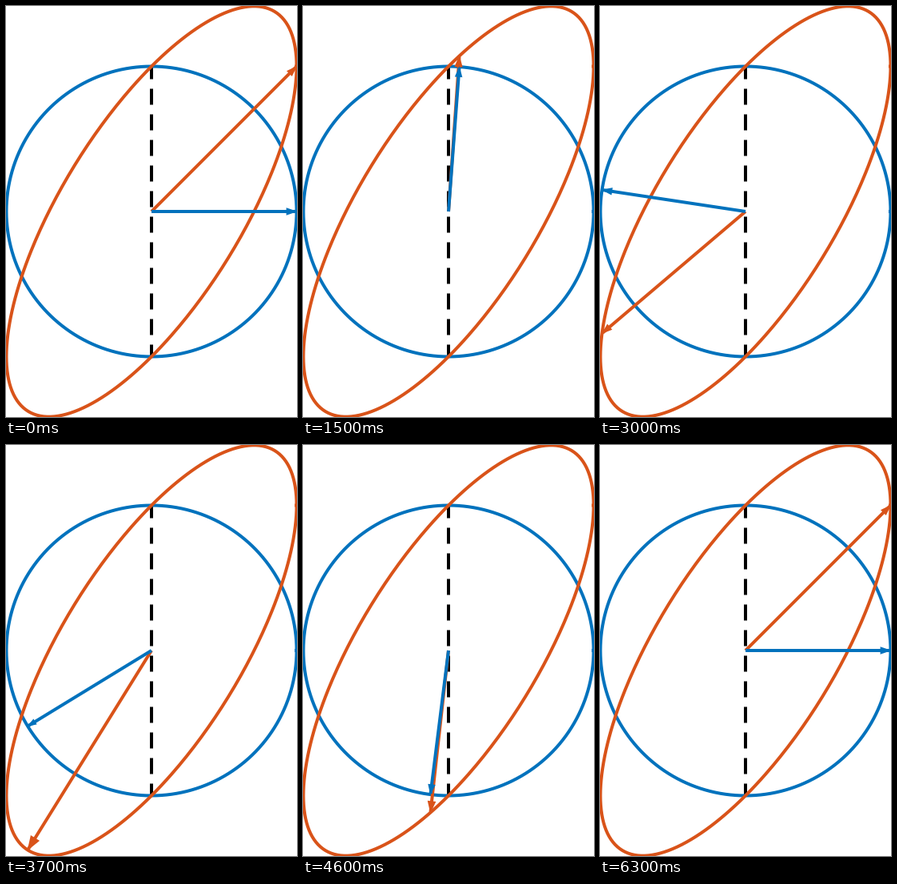
Write a matplotlib script that moves like this. It is 364x514 px and loops after 6400 ms.

```python
import numpy as np
import matplotlib.pyplot as plt
from matplotlib.animation import FuncAnimation
from matplotlib.patches import Polygon

W, H, DPI = 364, 514, 100
FRAMES, INTERVAL = 64, 100
RADIUS = 181.5
BLUE, ORANGE = "#0072BD", "#D95319"
LINE = 4 * 72 / DPI  # 4 px in points

fig = plt.figure(figsize=(W / DPI, H / DPI), dpi=DPI, facecolor="white")
ax = fig.add_axes([0, 0, 1, 1])
ax.set_xlim(-W / 2, W / 2)
ax.set_ylim(-H / 2, H / 2)
ax.axis("off")


def circle_point(angle):
    return RADIUS * np.array([np.cos(angle), np.sin(angle)])


def shear(p):
    return np.array([p[0], p[0] + p[1]])


class Arrow:
    """Vector from the centre with a filled head."""

    def __init__(self, color, z):
        self.shaft, = ax.plot([], [], color=color, lw=LINE, zorder=z,
                              solid_capstyle="butt")
        self.head = Polygon(np.zeros((3, 2)), closed=True, fc=color,
                            lw=0, zorder=z)
        ax.add_patch(self.head)

    def point_to(self, end):
        along = end / np.hypot(*end)
        side = np.array([-along[1], along[0]])
        size = 0.071 * np.abs(end).max()
        base = end - size * along
        half = 0.37 * size * side
        stop = end - along
        self.shaft.set_data([0, stop[0]], [0, stop[1]])
        self.head.set_xy([end + along, base + half, base - half])

    def artists(self):
        return [self.shaft, self.head]


# Dash lengths are in line widths
ax.plot([0, 0], [RADIUS, -RADIUS], color="black", lw=LINE, zorder=1,
        ls=(1.125, (5, 3)), dash_capstyle="butt")

ring = circle_point(np.linspace(0, 2 * np.pi, 361))
ax.plot(*ring, color=BLUE, lw=LINE, zorder=2)
ax.plot(*shear(ring), color=ORANGE, lw=LINE, zorder=3)

sheared = Arrow(ORANGE, 4)
plain = Arrow(BLUE, 5)


def update(i):
    p = circle_point(2 * np.pi * i / (FRAMES - 1))
    plain.point_to(p)
    sheared.point_to(shear(p))
    return sheared.artists() + plain.artists()


anim = FuncAnimation(fig, update, frames=FRAMES, interval=INTERVAL,
                     repeat=True, repeat_delay=0, blit=False)
plt.show()
```
